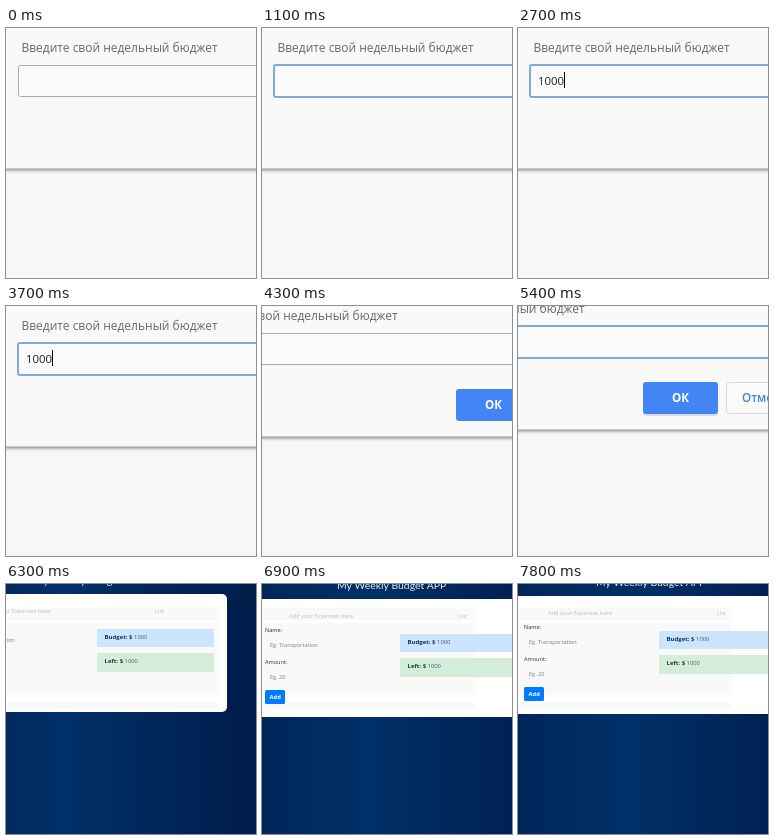
Animation of 250x250 px, one loop 8 s. Source, as an HTML page with a canvas:

```html
<!DOCTYPE html>
<html lang="ru">
<head>
<meta charset="utf-8">
<style>
html, body { margin: 0; width: 100%; height: 100%; overflow: hidden; }
canvas { display: block; }
</style>
</head>
<body>
<canvas id="stage" width="250" height="250"></canvas>
<script>
const ctx = document.getElementById('stage').getContext('2d');
const LOOP = 8000, STEP = 100;
const SANS = '"Open Sans", "Noto Sans", sans-serif';

// Camera paths: [time, x, y]
const dialogPath = [[4000, 0, 0], [4100, -20, -3], [4300, -76, -10], [4600, -131, -15], [4800, -145, -17]];
const appPath = [[6200, 84, 44], [6300, 91, 45], [6900, 138, 50], [7100, 141, 50], [7200, 141, 50], [7500, 141, 47]];
const keyTimes = [2300, 2400, 2600, 2700];

function along(path, t) {
  const next = path.findIndex(p => p[0] > t);
  if (next === 0) return path[0].slice(1);
  if (next < 0) return path[path.length - 1].slice(1);
  const a = path[next - 1], b = path[next], k = (t - a[0]) / (b[0] - a[0]);
  return [1, 2].map(i => Math.round(a[i] + (b[i] - a[i]) * k));
}

function text(str, x, y, size, color, weight = 400, family = SANS) {
  ctx.font = `${weight} ${size}px ${family}`;
  ctx.fillStyle = color;
  ctx.fillText(str, x, y);
}

function rect(x, y, w, h, color) {
  ctx.fillStyle = color;
  ctx.fillRect(x, y, w, h);
}

function rounded(x, y, w, h, r, fill, stroke, lineWidth = 1) {
  ctx.beginPath();
  ctx.roundRect(x, y, w, h, r);
  if (fill) { ctx.fillStyle = fill; ctx.fill(); }
  if (stroke) { ctx.strokeStyle = stroke; ctx.lineWidth = lineWidth; ctx.stroke(); }
}

function gradient(x0, y0, x1, y1, ...colors) {
  const g = ctx.createLinearGradient(x0, y0, x1, y1);
  colors.forEach((c, i) => g.addColorStop(i / (colors.length - 1), c));
  return g;
}

function caretVisible(t) {
  if (t < 600 || t >= 4100) return false;
  const since = t < 2300 ? t - 600 : t - 2700;
  return since < 0 || Math.floor(since / 500) % 2 === 0;
}

function drawDialog(t) {
  const [x, y] = along(dialogPath, t);
  rect(0, 0, 250, 250, '#f7f7f7');
  ctx.save();
  ctx.translate(x, y);
  rect(0, 0, 500, 141, '#f9f9f9');
  rect(0, 140, 500, 6, gradient(0, 140, 0, 146, '#d8d8d8', '#a9a9a9', '#d6d6d6', '#ececec', '#f7f7f7'));
  text('Введите свой недельный бюджет', 15.5, 24, 12, '#686868');

  const focused = t >= 600 && t < 4100 || t >= 5400;
  if (focused) rounded(12, 37, 440, 32, 2, '#fafafa', '#82a6e0', 2);
  else rounded(12.5, 37.5, 440, 31, 2, '#fafafa', '#aaa');

  const typed = keyTimes.filter(k => t >= k).length;
  text('1000'.slice(0, typed), 20, 57, 11.4, '#222');
  if (caretVisible(t)) rect(20 + Math.floor(typed * 6.5), 44, 1, 16, '#000');

  if (t >= 5200) rounded(270, 95, 75, 32, 3, 'rgba(0,0,0,.12)');
  rounded(270, 93, 75, 32, 3, '#4285f4');
  text('ОК', 299, 113, 11.6, '#fff', 700);
  rounded(353.5, 93.5, 82, 31, 3, '#fafafa', '#d5d8dc');
  text('Отмена', 369, 113, 11.6, '#4a80d8', 600);
  ctx.restore();
}

function drawTotal(label, y, h, color, ink) {
  rect(0, y, 117, h, color);
  text(label, 7.5, y + 10, 6, ink, 700);
  text('1000', 7.5 + ctx.measureText(label + ' ').width, y + 10, 5.8, '#4b5f70');
}

function drawApp(t) {
  const [x, y] = along(appPath, t);
  rect(0, 0, 250, 250, gradient(x - 210, 0, x + 150, 0, '#002052', '#003068', '#001d4c'));
  rounded(-20, y - 35, x + 150, 118, 5, '#fff');
  for (const [top, h] of [[24, 12], [39, 72], [118, 6]]) rect(0, top, 213, h, '#f9f9f9');

  ctx.save();
  ctx.translate(x, y);
  text('My Weekly Budget APP', -63, -45, 10.4, '#e8eef6', 400, 'Lato, sans-serif');
  text('Add your Expenses here', -111, -16, 5.7, '#bcbcbc');
  text('List', 58, -16, 5.7, '#bcbcbc');
  text('Name:', -135, -2, 5.6, '#2a2e33');
  text('Eg. Transportation', -130, 13, 5.6, '#747b82');
  text('Amount:', -135, 30, 5.6, '#2a2e33');
  text('Eg. 20', -130, 45, 5.6, '#747b82');
  rounded(-135, 56, 20, 14, 1.5, '#007bff');
  text('Add', -130.5, 65, 5.8, '#fff', 700);
  drawTotal('Budget: $', 0, 18, '#cce5ff', '#12305a');
  drawTotal('Left: $', 24, 19, '#d4edda', '#17402a');
  ctx.restore();
}

function frame(now) {
  const t = Math.floor(now % LOOP / STEP) * STEP;
  if (t < 5500) drawDialog(t);
  else drawApp(t);
  requestAnimationFrame(frame);
}
frame(0);
</script>
</body>
</html>
```
